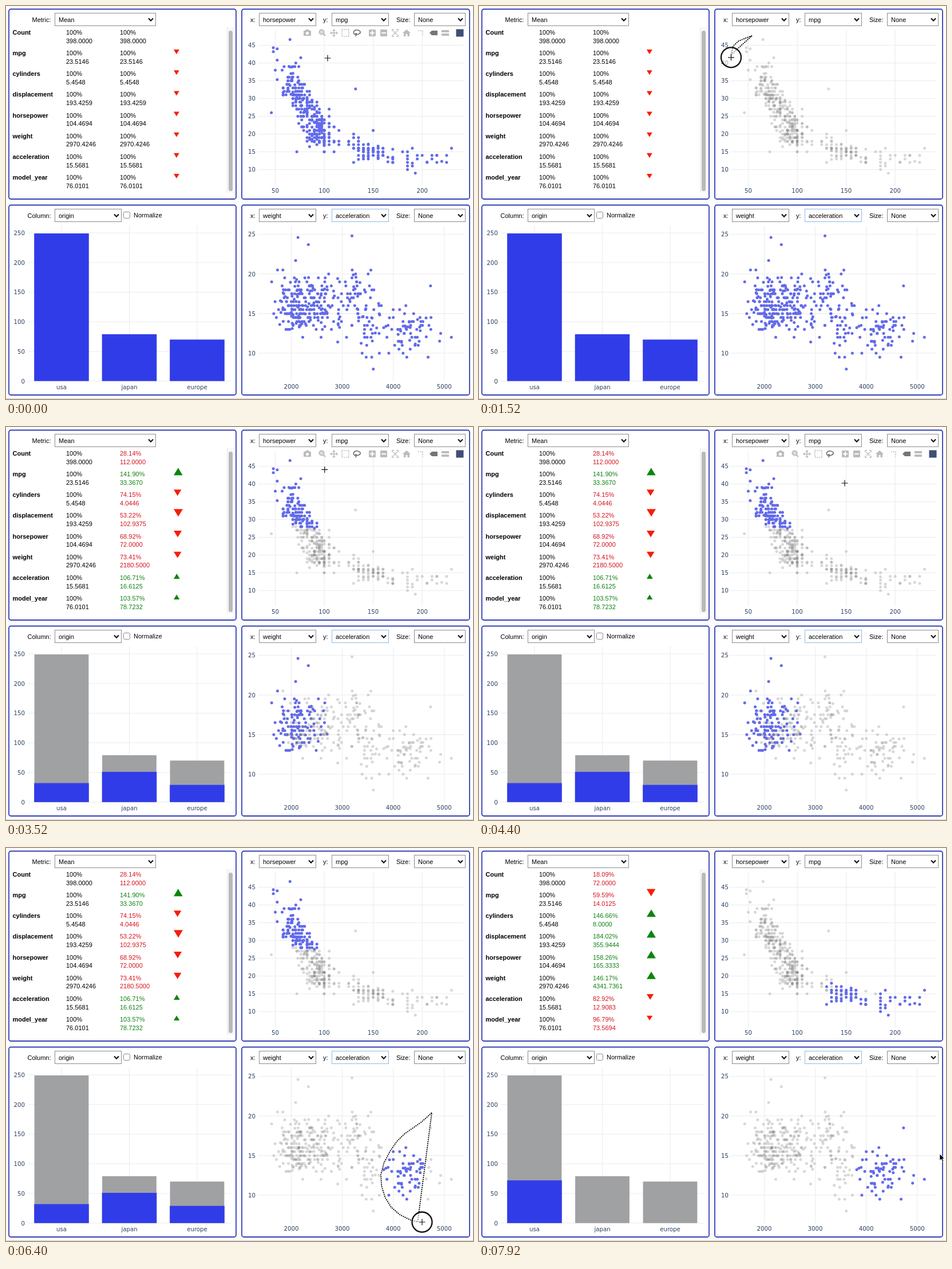
Recreate the animation shown at these times as an HTML page. Size 816 by 686 pixels, loop 8 s.

```html
<!DOCTYPE html>
<html lang="en">
<head>
<meta charset="utf-8">
<title>Linked charts</title>
<style>
html, body { margin: 0; width: 100%; height: 100%; overflow: hidden; background: #fff; }
svg { display: block; width: 816px; height: 686px; }
text { font: 11px "Liberation Sans", Arial, sans-serif; fill: #000; white-space: pre; }
.b { font-weight: bold; }
.tick { font: 10.2px "DejaVu Sans", Verdana, sans-serif; fill: #2a3f5f; }
.grid { stroke: #ebecef; stroke-width: 1.1; }
</style>
</head>
<body>
<svg id="stage" viewBox="0 0 816 686" xmlns="http://www.w3.org/2000/svg"></svg>
<script>
const LOOP = 8000, STEP = 80;
const BLUE = '#626be9', BAR = '#313ce9', RED = '#d5121c', GREEN = '#0b800f';

// Scales
const powerX = v => 470.5 + (v - 50) * 1.711;
const mpgY = v => 285.5 - (v - 10) * 6.2;
const weightX = v => 498.5 + (v - 2000) * .08907;
const accelY = v => 606 - (v - 10) * 13.83;
const barH = v => v * 1.035, BASE = 654.7;
const barX = i => 97 + i * 118.5;
const range = (from, to, step) => Array.from({ length: (to - from) / step + 1 }, (_, i) => from + i * step);

// Cars: a few classes scattered around a typical car, plus some extremes
let seed = 11;
const rnd = () => (seed = (seed * 16807) % 2147483647) / 2147483647;
const bell = ([mean, sd]) => mean + (rnd() + rnd() + rnd() - 1.5) * 2 * sd;
const snap = (v, step) => Math.round(v / step) * step;

const CLASSES = [
  { n: 102, power: [70, 8], mpg: [32.5, 3.2], slope: .15, weight: [2070, 190], accel: [16.5, 1.9] },
  { n: 116, power: [88, 8.5], mpg: [25, 2.8], slope: .2, weight: [2430, 260], accel: [15.7, 1.5] },
  { n: 76, power: [98, 8], mpg: [19.3, 1.8], slope: 0, weight: [3150, 290], accel: [16.4, 2] },
  { n: 28, power: [140, 13], mpg: [16.6, 1.9], slope: .06, weight: [3520, 130], accel: [13, 2.2] },
  { n: 44, power: [149, 9], mpg: [14.8, 1.4], slope: .04, weight: [4220, 230], accel: [13.4, 1.4] },
  { n: 24, power: [196, 17], mpg: [13.2, 1.5], slope: 0, weight: [4480, 270], accel: [12, 1.5] }
];
// horsepower, mpg, weight, acceleration
const EXTREMES = [
  [48, 44.3, 2085, 21.7], [48, 43.2, 2335, 23.7], [52, 44, 2130, 24.6], [65, 46.6, 2110, 17.9],
  [76, 41.5, 2144, 14.7], [132, 32.7, 2910, 11.4], [72, 15, 3190, 24.8], [46, 26, 1835, 20.5],
  [160, 14, 3609, 8], [193, 9, 4732, 18.5], [230, 16, 5140, 12]
];

function makeCar({ power, mpg, slope, weight, accel }) {
  const raw = bell(power), hp = snap(raw, raw < 80 ? 1 : raw < 100 ? 2.5 : 5);
  const m = bell(mpg) - slope * (hp - power[0]), a = bell(accel);
  return [hp, rnd() < .7 ? snap(m, 1) : m, bell(weight), rnd() < .65 ? snap(a, .5) : a];
}
const cars = [...CLASSES.flatMap(c => Array.from({ length: c.n }, () => makeCar(c))), ...EXTREMES]
  .map(([hp, m, w, a]) => ({ top: [powerX(hp), mpgY(m)], low: [weightX(w), accelY(a)] }));

// Lassos are smooth curves through key points, one point per pace
const LASSOS = [
  { start: 1237, pace: 195, keys: [[477, 52], [444, 70], [446, 118], [484, 163], [545, 177], [597, 153],
    [612, 105], [594, 77], [551, 64], [482, 53]] },
  { start: 5650, pace: 150, keys: [[744, 462], [725, 479], [683, 512], [655, 570], [673, 627], [727, 653],
    [785, 622], [797, 550], [785, 480]] }
];
const endOf = l => l.start + l.pace * (l.keys.length - 1);
const UPDATES = [3400, 7350];

// Pointer stops between the lassos: time, x, y
const STOPS = [
  [0, 562, 91], [300, 562, 91], [1237, 477, 52], [2992, 482, 53], [4100, 639, 98], [4480, 639, 98],
  [5280, 746, 462], [5650, 744, 462], [6850, 785, 480], [7600, 805, 534], [LOOP, 805, 534]
];

function curveAt(keys, u) {
  const last = keys.length - 1, i = Math.min(last - 1, Math.floor(u)), k = u - i;
  const at = j => keys[Math.max(0, Math.min(last, j))];
  return [0, 1].map(c => {
    const [a, b, d, e] = [-1, 0, 1, 2].map(j => at(i + j)[c]);
    return b + k / 2 * (d - a + k * (2 * a - 5 * b + 4 * d - e + k * (3 * (b - d) + e - a)));
  });
}
function lassoAt(l, t) {
  const u = Math.max(0, (Math.min(t, endOf(l)) - 20 - l.start) / l.pace);
  const count = Math.ceil(u * 3);
  return Array.from({ length: count + 1 }, (_, i) => curveAt(l.keys, Math.min(u, i / 3)));
}
function cursorAt(t, lasso) {
  if (lasso) return curveAt(lasso.keys, (t - lasso.start) / lasso.pace);
  const i = Math.max(1, STOPS.findIndex(p => p[0] >= t));
  const [t0, x0, y0] = STOPS[i - 1], [t1, x1, y1] = STOPS[i];
  const k = (t - t0) / (t1 - t0);
  return [x0 + (x1 - x0) * k, y0 + (y1 - y0) * k];
}
function inside([x, y], poly) {
  let hit = false;
  poly.forEach(([ax, ay], i) => {
    const [bx, by] = poly[(i + 1) % poly.length];
    if ((ay > y) !== (by > y) && x < (bx - ax) * (y - ay) / (by - ay) + ax) hit = !hit;
  });
  return hit;
}
const [whole1, whole2] = LASSOS.map(l => lassoAt(l, LOOP));

// Markup helpers
const text = (x, y, s, cls = '', anchor = 'start', extra = '') =>
  `<text x="${x}" y="${y}" class="${cls}" text-anchor="${anchor}" ${extra}>${s}</text>`;
const box = (x, y, w, h, fill, extra = '') =>
  `<rect x="${x}" y="${y}" width="${w}" height="${h}" fill="${fill}" ${extra}/>`;
const path = (d, extra = '') => `<path d="${d}" ${extra}/>`;
const grid = (xs, ys, [l, t, r, b]) =>
  path(xs.map(x => `M${x} ${t}V${b}`).join('') + ys.map(y => `M${l} ${y}H${r}`).join(''), 'class="grid"');
const panel = (x, y, w) => box(x, y, w, 331.5, '#fff', 'rx="3.5" stroke="#3440b4" stroke-width="1.8"');
const select = (x, y, w, s, line = '#8c8c8c') =>
  box(x + .5, y + .5, w - 1, 22, '#fff', `stroke="${line}"`) + text(x + 7, y + 15.5, s) +
  path(`M${x + w - 13} ${y + 9.5}l4 4.3 4-4.3`, 'fill="none" stroke="#111" stroke-width="2"');
const xTicks = (values, scale, y) => values.map(v => text(scale(v), y, v, 'tick', 'middle')).join('');
const yTicks = (values, scale, x) => values.map(v => text(x, scale(v) + 3.8, v, 'tick', 'end')).join('');

function scatter(top, [xName, xs, scaleX], [yName, ys, scaleY], line) {
  return panel(412, top - 6.5, 398) +
    text(427, top + 15.5, 'x:') + select(442, top, 100, xName) +
    text(554, top + 15.5, 'y:') + select(569, top, 100, yName, line) +
    text(682, top + 15.5, 'Size:') + select(713, top, 90, 'None') +
    grid(xs.map(scaleX), ys.map(scaleY), [440, top + 30, 800, top + 301]) +
    xTicks(xs, scaleX, top + 313.7) + yTicks(ys, scaleY, 436);
}

function toolbar(id, y) {
  const light = '#bcbcbc', dark = '#757575';
  const line = (d, c = light, w = 1.5, extra = '') => path(d, `fill="none" stroke="${c}" stroke-width="${w}" ${extra}`);
  const square = (x, d) => box(x - 6, -6, 12, 12, light, 'rx="1"') + line(d, '#fff', 2);
  return `<g id="${id}" transform="translate(0 ${y})">` +
    path('M520-4h3l1-2h5l1 2h3v9h-13z', `fill="${light}"`) + '<circle cx="526.5" cy="0.5" r="2.6" fill="#fff"/>' +
    '<circle cx="551.5" cy="-1.5" r="4" fill="#ddd" stroke="#bcbcbc" stroke-width="2"/>' + line('M554 1l4 4', light, 2.4) +
    line('M567 0h12M573-6v12M569-2l-2 2 2 2M577-2l2 2-2 2M571-4l2-2 2 2M571 4l2 2 2-2') +
    box(587, -6, 12, 12, 'none', `stroke="${light}" stroke-width="1.6" stroke-dasharray="2 1.4"`) +
    line('M610 3c-5-3-2-9 4-8s7 5 2 7-7 0-5-1 2 4-1 5', dark, 1.7) +
    square(640, 'M636 0h8M640-4v8') + square(660, 'M656 0h8') +
    line('M675-3v-3h3M682-6h3v3M685 3v3h-3M678 6h-3v-3M677-3l6 6M683-3l-6 6') +
    path('M693 0l7-6 7 6h-2v6h-3.5v-4h-3v4h-3.5v-6z', `fill="${light}"`) +
    line('M720-4h8v9', light, 1.5, 'stroke-dasharray="2 2"') +
    path('M740 0l4-4h10v8h-10z', `fill="${dark}"`) +
    path('M760-3l2-2h12v4h-12zM760 3l2-2h12v4h-12z', `fill="${light}"`) +
    box(786.5, -6.5, 13, 13, '#3f4f75') + '</g>';
}

const NAMES = ['Count', 'mpg', 'cylinders', 'displacement', 'horsepower', 'weight', 'acceleration', 'model_year'];
const MEANS = [
  [398, 23.5146, 5.4548, 193.4259, 104.4694, 2970.4246, 15.5681, 76.0101],
  [112, 33.367, 4.0446, 102.9375, 72, 2180.5, 16.6125, 78.7232],
  [72, 14.0125, 8, 355.9444, 165.3333, 4341.7361, 12.9083, 73.5694]
];
const ORIGINS = ['usa', 'japan', 'europe'];
const COUNTS = [[249, 79, 70], [32, 51, 29], [72, 0, 0]];
const rowY = i => 50 + i * 36.15;

function statCells(stage) {
  return NAMES.map((_, i) => {
    const y = rowY(i), v = MEANS[stage][i], ratio = v / MEANS[0][i];
    const ink = `style="fill:${ratio === 1 ? '#000' : ratio > 1 ? GREEN : RED}"`;
    const share = ratio === 1 ? '100%' : (ratio * 100).toFixed(2) + '%';
    const w = Math.min(16, 9.8 + 14 * Math.abs(ratio - 1)), h = w * .82, base = y - 2;
    const arrow = ratio > 1
      ? path(`M293 ${base}h${w}l${-w / 2} ${-h}z`, 'fill="#0b860d"')
      : path(`M293 ${base - h}h${w}l${-w / 2} ${h}z`, 'fill="#f71e08"');
    return text(199, y, share, '', 'start', ink) + text(199, y + 14.7, v.toFixed(4), '', 'start', ink) + (i ? arrow : '');
  }).join('');
}

function bars(stage) {
  return ORIGINS.map((_, i) => {
    const x = barX(i) - 47.8, h = barH(COUNTS[0][i]), part = barH(COUNTS[stage][i]);
    return (stage ? box(x + .4, BASE - h, 94.8, h, '#a0a1a3') : '') + box(x, BASE - part, 95.6, part, BAR);
  }).join('');
}

const dots = key => `<g id="${key}">` +
  cars.map(c => `<circle cx="${c[key][0].toFixed(1)}" cy="${c[key][1].toFixed(1)}" r="2.5"/>`).join('') + '</g>';
const countTicks = range(0, 250, 50), countY = v => BASE - barH(v);

document.getElementById('stage').innerHTML =
  box(0, 0, 816, 686, '#fdfdfd') + box(0, 685, 816, 1, '#cfcfcf') +
  panel(5, 5.5, 397) + text(78.5, 27.5, 'Metric:', '', 'end') + select(85, 12, 177, 'Mean') +
  box(386, 37, 12, 289, '#f8f8f8') + box(386, 37, 1, 289, '#e6e6e6') + box(389, 43, 7, 280, '#b9b9b9', 'rx="3.5"') +
  NAMES.map((s, i) => text(11.5, rowY(i), s, 'b') + text(105, rowY(i), '100%') +
    text(105, rowY(i) + 14.7, MEANS[0][i].toFixed(4))).join('') + '<g id="stats"></g>' +
  panel(5, 347.5, 397) + text(78.5, 369.5, 'Column:', '', 'end') + select(85, 354, 117, 'origin') +
  box(205.5, 359.5, 11, 11, '#fff', 'rx="2" stroke="#8a8a8a"') + text(223, 369, 'Normalize') +
  grid(ORIGINS.map((_, i) => barX(i)), countTicks.map(countY), [38, 383, 394, BASE]) +
  yTicks(countTicks, countY, 33) +
  ORIGINS.map((s, i) => text(barX(i), 669.2, s, 'tick', 'middle')).join('') + '<g id="bars"></g>' +
  scatter(12, ['horsepower', range(50, 200, 50), powerX], ['mpg', range(10, 45, 5), mpgY], '#8c8c8c') +
  scatter(354, ['weight', range(2000, 5000, 1000), weightX], ['acceleration', range(10, 25, 5), accelY], '#8fbbe2') +
  dots('top') + dots('low') + toolbar('toolsTop', 47) + toolbar('toolsLow', 389) +
  '<g id="lasso" fill="none" stroke-width="1.8"><path stroke="#fff"/><path stroke="#000" stroke-dasharray="2 1.5"/></g>' +
  '<g id="cursor"><circle r="17.5" fill="#fff" fill-opacity=".55" stroke="#111" stroke-width="2.3"/>' +
  path('M-5.5 0h11M0-5.5v11', 'stroke="#111" stroke-width="1.2"') +
  path('M0 0v11.5l2.7-2.5 2 4.5 2-.9-2-4.3h3.6z', 'fill="#000" stroke="#fff" stroke-width=".7"') + '</g>';

const $ = id => document.getElementById(id);
const show = (el, on) => el.setAttribute('visibility', on ? 'visible' : 'hidden');
const [ring, cross, arrow] = $('cursor').children;

function paint(key, picked) {
  [...$(key).children].forEach((el, i) => {
    const on = picked(cars[i]);
    if (el.on === on) return;
    el.on = on;
    el.setAttribute('fill', on ? BLUE : '#888');
    el.setAttribute('fill-opacity', on ? 1 : .33);
  });
}

let lastStage = -1, lastTime = -1;

function draw(t) {
  const stage = UPDATES.filter(u => t >= u).length;
  if (stage !== lastStage) {
    $('stats').innerHTML = statCells(stage);
    $('bars').innerHTML = bars(stage);
    lastStage = stage;
  }

  // Each chart follows its own lasso, or the cars picked in the other chart
  const [first, second] = LASSOS.map(l => lassoAt(l, t));
  const all = () => true;
  paint('top', t < LASSOS[0].start ? all : stage < 2 ? c => inside(c.top, first) : c => inside(c.low, whole2));
  paint('low', t >= LASSOS[1].start ? c => inside(c.low, second) : stage ? c => inside(c.top, whole1) : all);

  const lasso = LASSOS.find(l => t >= l.start && t < endOf(l));
  show($('lasso'), lasso);
  if (lasso) {
    const d = 'M' + lassoAt(lasso, t).map(p => p.join(' ')).join('L') + 'Z';
    for (const el of $('lasso').children) el.setAttribute('d', d);
  }

  const [x, y] = cursorAt(t, lasso), over = !lasso && x > 414 && x < 802;
  const plotting = lasso || (x > 440 && x < 800 && ((y > 42 && y < 313) || (y > 384 && y < 655)));
  show($('toolsTop'), over && y < 336);
  show($('toolsLow'), over && y > 380);
  $('cursor').setAttribute('transform', `translate(${x} ${y})`);
  show(ring, lasso);
  show(cross, plotting);
  show(arrow, !plotting);
}

function tick() {
  const t = Math.floor(performance.now() % LOOP / STEP) * STEP;
  if (t !== lastTime) draw(lastTime = t);
  requestAnimationFrame(tick);
}
tick();
</script>
</body>
</html>
```
